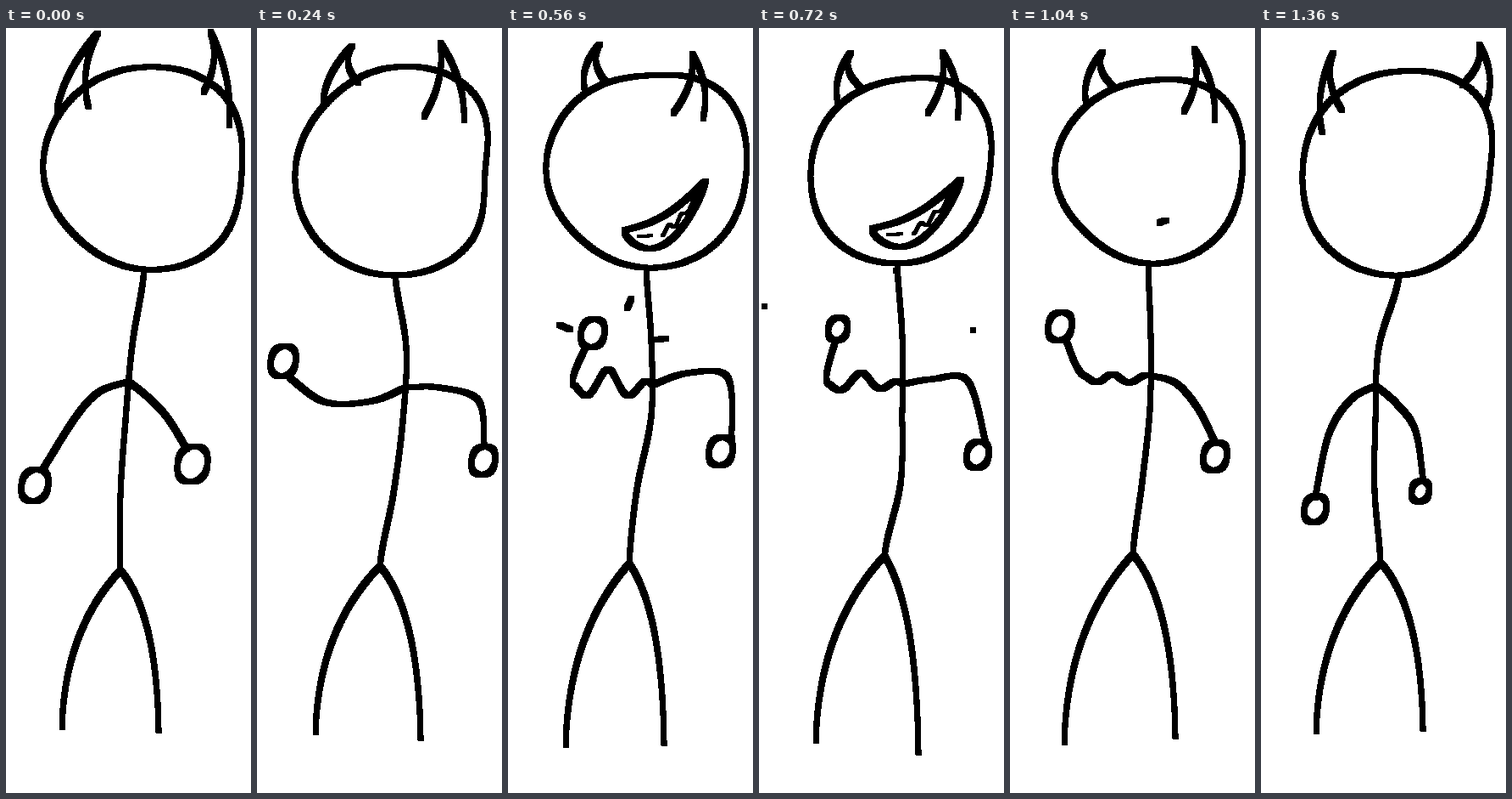
Recreate the animation shown at these times as an HTML page with a canvas. Size 289 by 900 pixels, loop 1.44 s.

```html
<!DOCTYPE html>
<html lang="en">
<head>
<meta charset="utf-8">
<title>Horned stick figure</title>
<style>
html, body { margin: 0; width: 100%; height: 100%; overflow: hidden; background: #fff; }
canvas { display: block; }
</style>
</head>
<body>
<canvas id="stage" width="289" height="900"></canvas>
<script>
const ctx = document.getElementById('stage').getContext('2d');
const LOOP = 1440, STEP = 80, BRUSH = 7;
const CENTRE = { x: 163, y: 170 };
const SNAP = 560, SPARK_LIFE = 160;

// head: radius every 45 degrees, clockwise from the right
// horns: left foot, tip, right foot    spine: x at each quarter, hip y, shoulder y
// arms: upper arm, elbow, wrist        hands: centre and size
const poses = [
  { time: 0, head: [115, 121, 114, 110, 119, 122, 124, 131],
    hornL: [60, 97, 108, 6, 97, 92], hornR: [233, 75, 241, 4, 263, 114],
    spine: [149, 141, 135, 135], hip: [638], shoulder: [416], wave: [0],
    armL: [110, 428, 82, 458, 43, 520], armR: [166, 433, 190, 458, 213, 495],
    handL: [34, 538, 17], handR: [220, 513, 19], feet: [66, 822, 180, 826] },
  { time: 240, head: [106, 121, 121, 122, 118, 115, 124, 131],
    hornL: [78, 90, 112, 21, 119, 64], hornR: [197, 104, 216, 17, 244, 108],
    spine: [176, 172, 161, 145], hip: [633], shoulder: [423], wave: [0],
    armL: [135, 439, 80, 440, 38, 411], armR: [215, 423, 261, 438, 268, 490],
    handL: [31, 392, 16], handR: [267, 509, 15], feet: [69, 828, 193, 835] },
  { time: 560, head: [118, 117, 112, 110, 118, 118, 114, 130],
    hornL: [91, 74, 108, 19, 116, 64], hornR: [195, 100, 217, 30, 230, 106],
    spine: [169, 169, 152, 143], hip: [630], shoulder: [420], wave: [17],
    armL: [123, 418, 77, 420, 92, 374], armR: [212, 406, 259, 411, 264, 482],
    handL: [100, 359, 15], handR: [251, 498, 15], feet: [68, 843, 184, 841] },
  { time: 720, head: [109, 108, 107, 108, 102, 104, 109, 127],
    hornL: [94, 91, 108, 29, 119, 69], hornR: [199, 100, 216, 28, 234, 105],
    spine: [169, 169, 167, 148], hip: [621], shoulder: [419], wave: [10],
    armL: [125, 415, 81, 418, 90, 368], armR: [205, 413, 246, 415, 267, 486],
    handL: [93, 354, 12], handR: [258, 502, 14], feet: [67, 838, 188, 852] },
  { time: 1040, head: [111, 111, 107, 102, 110, 107, 108, 124],
    hornL: [90, 89, 109, 28, 122, 69], hornR: [205, 98, 217, 24, 241, 108],
    spine: [166, 165, 156, 145], hip: [619], shoulder: [409], wave: [6],
    armL: [125, 413, 86, 408, 66, 367], armR: [196, 418, 222, 448, 242, 488],
    handL: [59, 351, 15], handR: [242, 504, 15], feet: [64, 840, 195, 833] },
  { time: 1200, head: [109, 111, 110, 108, 96, 98, 101, 123],
    hornL: [94, 134, 133, 40, 124, 106], hornR: [222, 67, 248, 29, 256, 80],
    spine: [147, 145, 146, 143], hip: [612], shoulder: [428], wave: [0],
    armL: [110, 445, 84, 467, 75, 489], armR: [170, 447, 191, 474, 200, 522],
    handL: [71, 507, 16], handR: [203, 535, 13], feet: [64, 833, 186, 833] },
  { time: 1360, head: [107, 114, 121, 122, 114, 117, 119, 129],
    hornL: [72, 122, 85, 29, 95, 96], hornR: [237, 67, 257, 19, 266, 88],
    spine: [139, 135, 134, 141], hip: [629], shoulder: [421], wave: [0],
    armL: [106, 437, 80, 478, 64, 552], armR: [160, 442, 182, 473, 191, 530],
    handL: [64, 566, 14], handR: [188, 545, 11], feet: [65, 827, 191, 824] }
];

const smiles = [
  { time: 400, corners: [176, 229, 184, 226], open: [0] },
  { time: 560, corners: [137, 238, 233, 180], open: [1] },
  { time: 720, corners: [133, 236, 238, 178], open: [1] },
  { time: 1040, corners: [176, 229, 184, 226], open: [0] }
];

const sparks = [
  { x: 67, y: 352, dx: -61, dy: -25 },
  { x: 143, y: 324, dx: 18, dy: -39 },
  { x: 180, y: 366, dx: 72, dy: -11 }
];

const mix = (a, b, u) => a + (b - a) * u;

function sample(keys, time) {
  const next = keys.findIndex(k => k.time >= time);
  if (next < 0 || time < keys[0].time) return null;
  const b = keys[next], a = keys[Math.max(0, next - 1)];
  const u = a === b ? 0 : (time - a.time) / (b.time - a.time);
  const result = {};
  for (const part in a) {
    if (part !== 'time') result[part] = a[part].map((v, i) => mix(v, b[part][i], u));
  }
  return result;
}

// Catmull-Rom value at position v along a row of numbers.
function spline(values, v, closed = false) {
  const n = values.length;
  const i = closed ? Math.floor(v) : Math.min(n - 2, Math.floor(v));
  const u = v - i;
  const [a, b, c, d] = [-1, 0, 1, 2].map(k =>
    values[closed ? (i + k + n) % n : Math.max(0, Math.min(n - 1, i + k))]);
  return b + u / 2 * (c - a + u * (2 * a - 5 * b + 4 * c - d + u * (3 * (b - c) + d - a)));
}

// Stamps a square brush on whole pixels along point(u), u from 0 to 1.
function trace(point, size = BRUSH, steps = 700) {
  for (let i = 0; i <= steps; i++) {
    const [x, y] = point(i / steps);
    ctx.fillRect(Math.round(x - size / 2), Math.round(y - size / 2), size, size);
  }
}

const line = (x0, y0, x1, y1) => trace(u => [mix(x0, x1, u), mix(y0, y1, u)]);

const bend = (x0, y0, cx, cy, x1, y1) => trace(u => [
  mix(mix(x0, cx, u), mix(cx, x1, u), u),
  mix(mix(y0, cy, u), mix(cy, y1, u), u)
]);

function drawHead(radii) {
  trace(u => {
    const r = spline(radii, u * 8, true), angle = u * 2 * Math.PI;
    return [CENTRE.x + r * Math.cos(angle), CENTRE.y + r * Math.sin(angle)];
  });
}

function drawHorn([x0, y0, tipX, tipY, x1, y1], bow) {
  for (const [x, y] of [[x0, y0], [x1, y1]]) {
    bend(x, y, (x + tipX) / 2 + 2 * bow, (y + tipY) / 2, tipX, tipY);
  }
}

function drawArm(x, y, [upX, upY, elbowX, elbowY, wristX, wristY], wave = 0) {
  const xs = [x, upX, elbowX, wristX], ys = [y, upY, elbowY, wristY];
  trace(u => {
    const v = u * 3, along = Math.min(1, v / 2);
    const ripple = wave * Math.sin(Math.PI * along) * Math.sin(4 * Math.PI * along - 2.26);
    return [spline(xs, v), spline(ys, v) + ripple];
  });
}

function drawHand([x, y, size]) {
  const soften = v => Math.sign(v) * Math.abs(v) ** 0.85;
  trace(u => {
    const angle = u * 2 * Math.PI;
    const dy = 1.1 * size * soften(Math.sin(angle));
    return [x + 0.93 * size * soften(Math.cos(angle)) - 0.12 * dy, y + dy];
  });
}

function drawLeg(hipX, hipY, footX, footY, knee) {
  bend(hipX, hipY, mix(hipX, footX, 0.95), mix(hipY, footY, knee), footX, footY);
}

function drawFigure(p) {
  const neckY = CENTRE.y + p.head[2], hipY = p.hip[0], hipX = p.spine[3];
  const spineX = u => spline([CENTRE.x, ...p.spine], u * 4);
  const shoulderY = p.shoulder[0];
  const shoulderX = spineX((shoulderY - neckY) / (hipY - neckY));
  drawHead(p.head);
  drawHorn(p.hornL, -8);
  drawHorn(p.hornR, 8);
  trace(u => [spineX(u), mix(neckY, hipY, u)]);
  drawArm(shoulderX, shoulderY, p.armL, p.wave[0]);
  drawArm(shoulderX, shoulderY, p.armR);
  drawHand(p.handL);
  drawHand(p.handR);
  drawLeg(hipX, hipY, p.feet[0], p.feet[1], 0.38);
  drawLeg(hipX, hipY, p.feet[2], p.feet[3], 0.27);
}

function drawSmile({ corners: [x0, y0, x1, y1], open: [open] }) {
  // depth runs from the upper lip (0) to the lower lip (1)
  const inside = (u, depth) => {
    const arch = Math.sin(Math.PI * u);
    const sag = mix(11 * arch, 45 * Math.max(0, arch) ** 0.7, depth);
    return [mix(x0, x1, u), mix(y0, y1, u) + open * sag];
  };
  trace(u => inside(u, 0));
  trace(u => inside(u, 1));
  trace(u => inside(mix(0.18, 0.33, u), 0.5), 4);
  trace(u => inside(mix(0.47, 0.97, u), 0.55 + 0.12 * Math.cos(u * 20)), 4);
}

function drawSparks(age) {
  for (const s of sparks) {
    const x = s.x + s.dx * age, y = s.y + s.dy * age;
    const half = 6.5 * (1 - age) / Math.hypot(s.dx, s.dy);
    line(x - s.dx * half, y - s.dy * half, x + s.dx * half, y + s.dy * half);
  }
}

function draw(time) {
  ctx.fillStyle = '#fff';
  ctx.fillRect(0, 0, 289, 900);
  ctx.fillStyle = '#000';
  drawFigure(sample(poses, time));
  const smile = sample(smiles, time);
  if (smile) drawSmile(smile);
  const age = (time - SNAP) / SPARK_LIFE;
  if (age >= 0 && age <= 1) drawSparks(age);
}

function tick() {
  const time = performance.now() % LOOP;
  draw(Math.floor(time / STEP) * STEP);
  requestAnimationFrame(tick);
}
tick();
</script>
</body>
</html>
```
